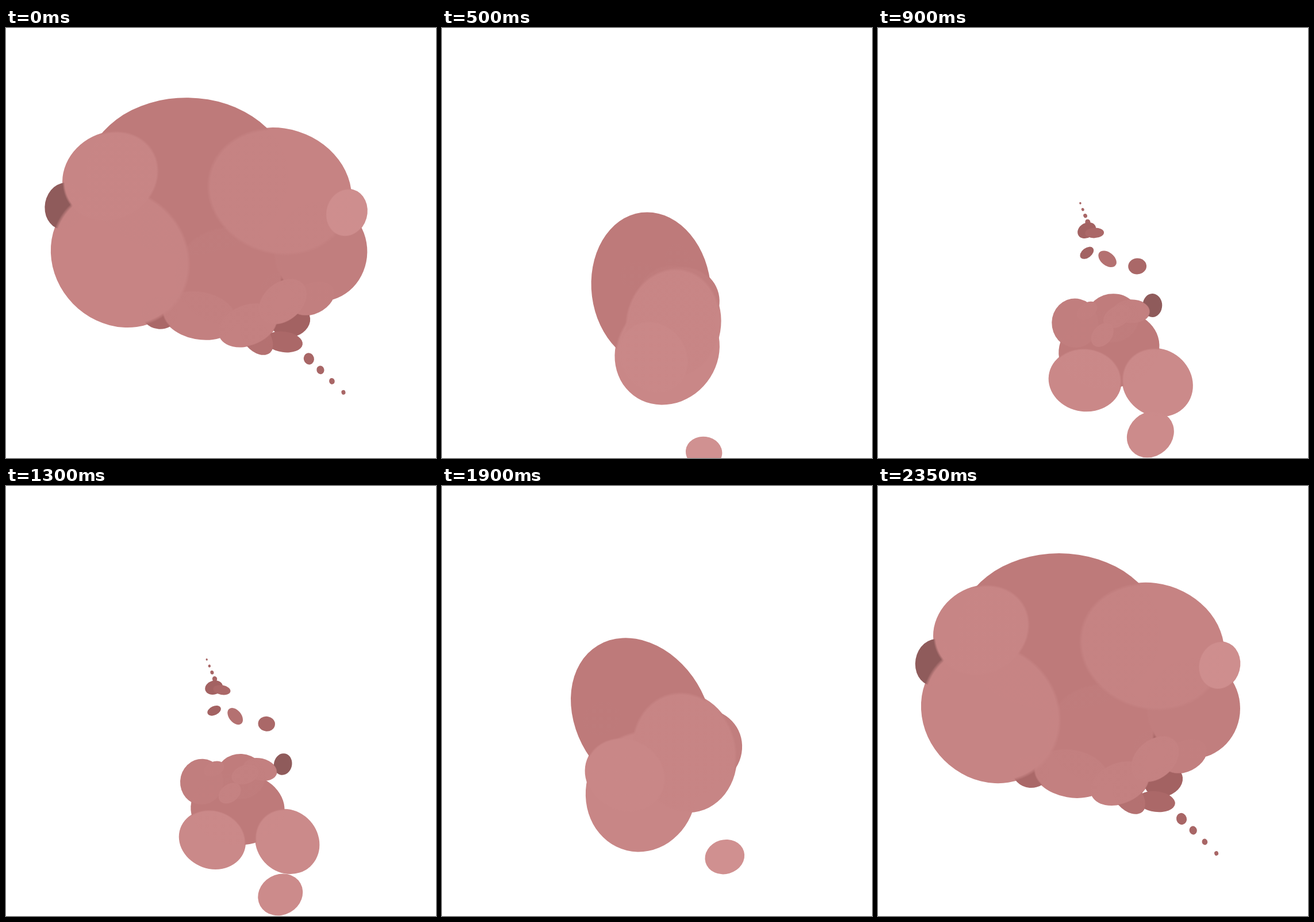
Write an HTML page with a canvas that moves like this. It is 748x748 px and loops after 2.4 s.

```html
<!DOCTYPE html>
<html lang="en">
<head>
<meta charset="utf-8">
<title>Thought bubble</title>
<style>
  html, body { margin: 0; width: 100%; height: 100%; overflow: hidden; background: #fff; }
  canvas { display: block; width: 748px; height: 748px; }
</style>
</head>
<body>
<canvas width="748" height="748"></canvas>
<script>
const ctx = document.querySelector('canvas').getContext('2d');
const LOOP = 2400, STEP = 50, PEAK = 2350;
const SPIN = 190, SHRINK = .56, SOFT = .95;

const blobs = [];

// Front place, depth, radii, tilt and lightness; bow bends the path.
function blob(x, y, depth, rx, ry, tilt, light, bowX = 0, bowY = 0) {
  // place in the view from behind and above
  const farX = 364 - .37 * x + .315 * y + .17 * depth;
  const farY = .46 * y + depth;
  blobs.push({ x, y, farX, farY, rx, ry, tilt, light, bowX, bowY });
}

// back lobes
blob(99, 307, 343, 34, 41, 10, 46);
blob(266, 497, 185, 32, 28, 5, 53.7);

// trail of dots
for (let i = 0; i < 4; i++) {
  const r = 9.6 * .73 ** i;
  blob(528 + 20.2 * i, 579 + 20 * i, 69 - 20.5 * i, .94 * r, 1.06 * r, -15, 53);
}

// stem
blob(470, 445, 186, 27, 17, -28, 51);
blob(497, 514, 114, 34, 26, -20, 51);
blob(484, 549, 102, 33, 18, 7, 54);
blob(436, 540, 152, 36, 23, 48, 57.5);

// crown
blob(315, 254, 445, 177, 137, 0, 61.2, -9, -20);

// underside
blob(388, 430, 308, 94, 86, 0, 62);
blob(548, 387, 337, 82, 87, 0, 62.6);
blob(336, 500, 263, 66, 42, 10, 63.2);
blob(534, 470, 276, 41, 27, -27, 63);
blob(421, 517, 264, 54, 36, -22, 63.6);
blob(482, 475, 316, 48, 34, -41, 64);

// front lobes
blob(197, 395, 437, 128, 116, 45, 64.8, 13, 14);
blob(476, 279.5, 487, 128, 110, 17, 64.4);
blob(180, 251, 596, 87, 76, -32, 65.2);
blob(594, 312, 778, 42, 36, -75, 68.3);

const mix = (a, b, f) => a + (b - a) * f;

function draw(u) {
  const swingX = Math.sin(Math.PI / 2 * u);
  const swingY = Math.sin(Math.PI / 2 * u ** .85);
  const bow = 9.7 * u * (1 - u) ** 3;
  const size = 1 - SHRINK * u;

  ctx.clearRect(0, 0, 748, 748);
  for (const b of blobs) {
    const l = b.light + (b.light > 64.2 ? 2.2 * u : 0);
    const tone = `0, ${22 + (l - 46) * .8}%, ${l}%`;
    const solid = `hsl(${tone})`;
    ctx.save();
    ctx.translate(mix(b.x, b.farX, swingX) + b.bowX * bow,
                  mix(b.y, b.farY, swingY) + b.bowY * bow);
    ctx.rotate((b.tilt + SPIN * u) * Math.PI / 180);
    ctx.scale(b.rx * size, b.ry * size);
    ctx.beginPath();
    ctx.arc(0, 0, 1, 0, 2 * Math.PI);
    if (b.light > 57) {
      // overlaps melt together while the outline stays crisp
      const melt = ctx.createRadialGradient(0, 0, SOFT, 0, 0, 1);
      melt.addColorStop(0, solid);
      melt.addColorStop(1, `hsla(${tone}, 0)`);
      ctx.globalCompositeOperation = 'source-atop';
      ctx.fillStyle = melt;
      ctx.fill();
      ctx.globalCompositeOperation = 'destination-over';
    }
    ctx.fillStyle = solid;
    ctx.fill();
    ctx.restore();
  }
}

function tick() {
  const t = Math.floor((performance.now() + 2) / STEP) * STEP;
  draw((1 - Math.cos(2 * Math.PI * (t - PEAK) / LOOP)) / 2);
  requestAnimationFrame(tick);
}
tick();
</script>
</body>
</html>
```
